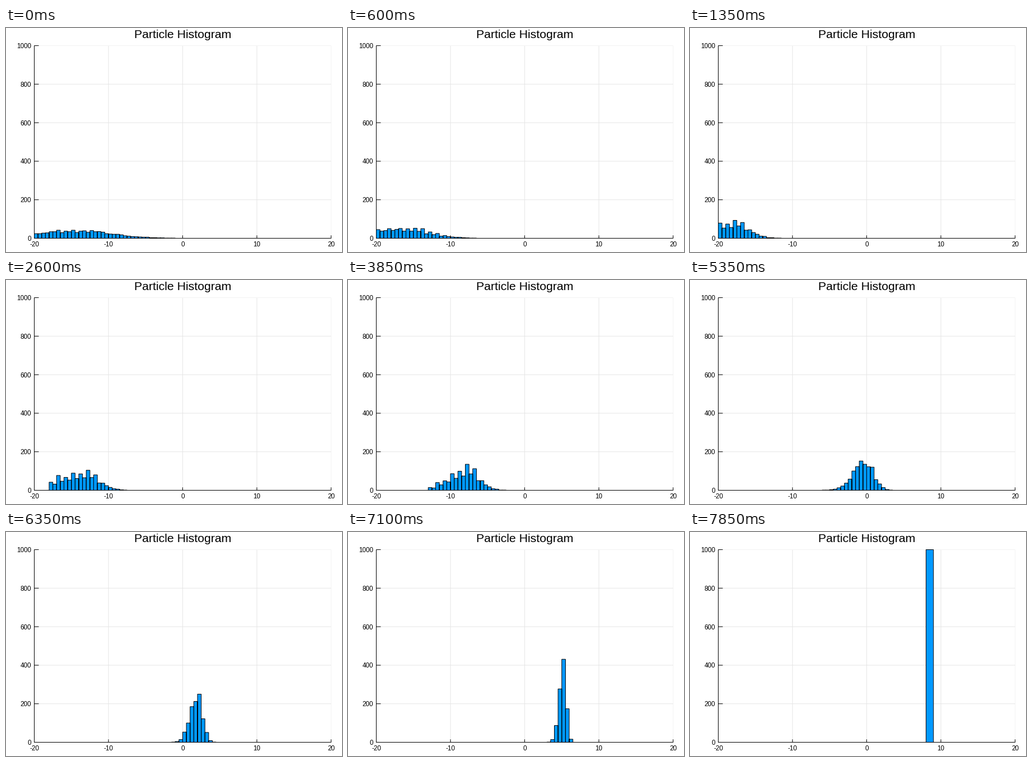
Recreate the animation shown at these times as a matplotlib script. Size 600x400 px, loop 8 s.

```python
import numpy as np
import matplotlib.pyplot as plt
from matplotlib.animation import FuncAnimation
from matplotlib.patches import PathPatch
from matplotlib.path import Path

W, H, DPI = 600, 400, 100
TICK_MS, LOOP_MS = 50, 8000
FIRST_MS, STEP_MS = 100, 250
PX = 72 / DPI            # one pixel in points
TOTAL, BIN = 1000, 0.5

# Bins travel with the particles, one unit per step.
bins = np.arange(-29, 4, BIN)
parity = np.where(bins % 1 == 0, 1, -1)
noise = np.exp(np.random.default_rng(4).normal(0, 0.12, len(bins)))

# step, peak bin, left spread, right spread, odd/even contrast
KEYS = np.array([
    (0, -14.5, 5.9, 4.6, 0),
    (6, -24, 5.3, 1.9, 0.25),
    (11, -24.5, 3.5, 1.9, 0.25),
    (16, -24, 2.4, 1.6, 0.28),
    (22, -22.4, 1.65, 1.1, 0.1),
    (24, -23.1, 0.6, 0.5, 0.1),
    (26, -24.4, 0.9, 0.75, 0.15),
    (30, -23.95, 0.45, 0.3, 0.05),
    (32, -23.75, 0.12, 0.12, 0),
])


def sx(v):
    return 50.5 + 13.25 * (v + 20)


def sy(n):
    return 375.5 - 0.344 * n


def counts_at(step):
    """A two-sided bell over the bins that narrows as particles resample."""
    peak, left, right, comb = (np.interp(step, KEYS[:, 0], col)
                               for col in KEYS[:, 1:].T)
    spread = np.where(bins < peak, left, right)
    weight = np.exp(-0.5 * ((bins - peak) / spread) ** 2)
    weight *= noise * (1 + comb * parity)
    return np.round(TOTAL * weight / weight.sum())


def bar(left, width, n):
    x0, x1, y0, y1 = sx(left), sx(left + width), sy(0), sy(n)
    return Path([(x0, y0), (x0, y1), (x1, y1), (x1, y0), (x0, y0)], closed=True)


def bars_at(step):
    counts = counts_at(step)
    used = counts > 0
    lefts, counts = bins[used] + step, counts[used]
    if len(lefts) <= 2:          # a single unit is left: one wide bar
        return bar(lefts[0], 1, counts.sum())
    return Path.make_compound_path(
        *[bar(x, BIN, n) for x, n in zip(lefts, counts) if x >= -20])


fig = plt.figure(figsize=(W / DPI, H / DPI), dpi=DPI, facecolor="white")
ax = fig.add_axes([0, 0, 1, 1])
ax.set_xlim(0, W)
ax.set_ylim(H, 0)
ax.axis("off")


def line(x0, y0, x1, y1, color="black", z=3):
    ax.plot([x0, x1], [y0, y1], color=color, lw=PX, zorder=z, snap=False,
            solid_capstyle="butt")


def label(x, y, text, size, ha):
    ax.text(x, y, text, fontsize=size * PX, ha=ha, va="baseline",
            family="Liberation Sans", color="black")


L, R, T, B = sx(-20), sx(20), sy(TOTAL), sy(0)
GRID, EDGE = "#e6e6e6", "#f3f3f3"

for v in range(-20, 21, 10):
    x = sx(v)
    if v > -20:
        line(x, T, x, B, EDGE if v == 20 else GRID, 1)
    line(x, B, x, B - 5.2)
    label(x, 389.8, str(v), 11.6, "center")
for n in range(0, TOTAL + 1, 200):
    y = sy(n)
    if n > 0:
        line(L, y, R, y, EDGE if n == TOTAL else GRID, 1)
    line(L, y, L + 8, y)
    label(45, y + 4.5, str(n), 11.6, "right")
line(L, T, L, B + 0.5)
line(L - 0.5, B, R + 0.5, B)
label(315.8, 18, "Particle Histogram", 21.3, "center")

bars = PathPatch(bars_at(0), facecolor="#0099ff", edgecolor="black",
                 linewidth=PX, zorder=2, snap=False)
ax.add_patch(bars)


def update(i):
    ms = i * TICK_MS
    step = 0 if ms < FIRST_MS else 1 + (ms - FIRST_MS) // STEP_MS
    bars.set_path(bars_at(step))
    return [bars]


anim = FuncAnimation(fig, update, frames=LOOP_MS // TICK_MS, interval=TICK_MS,
                     repeat=True)
plt.show()
```
